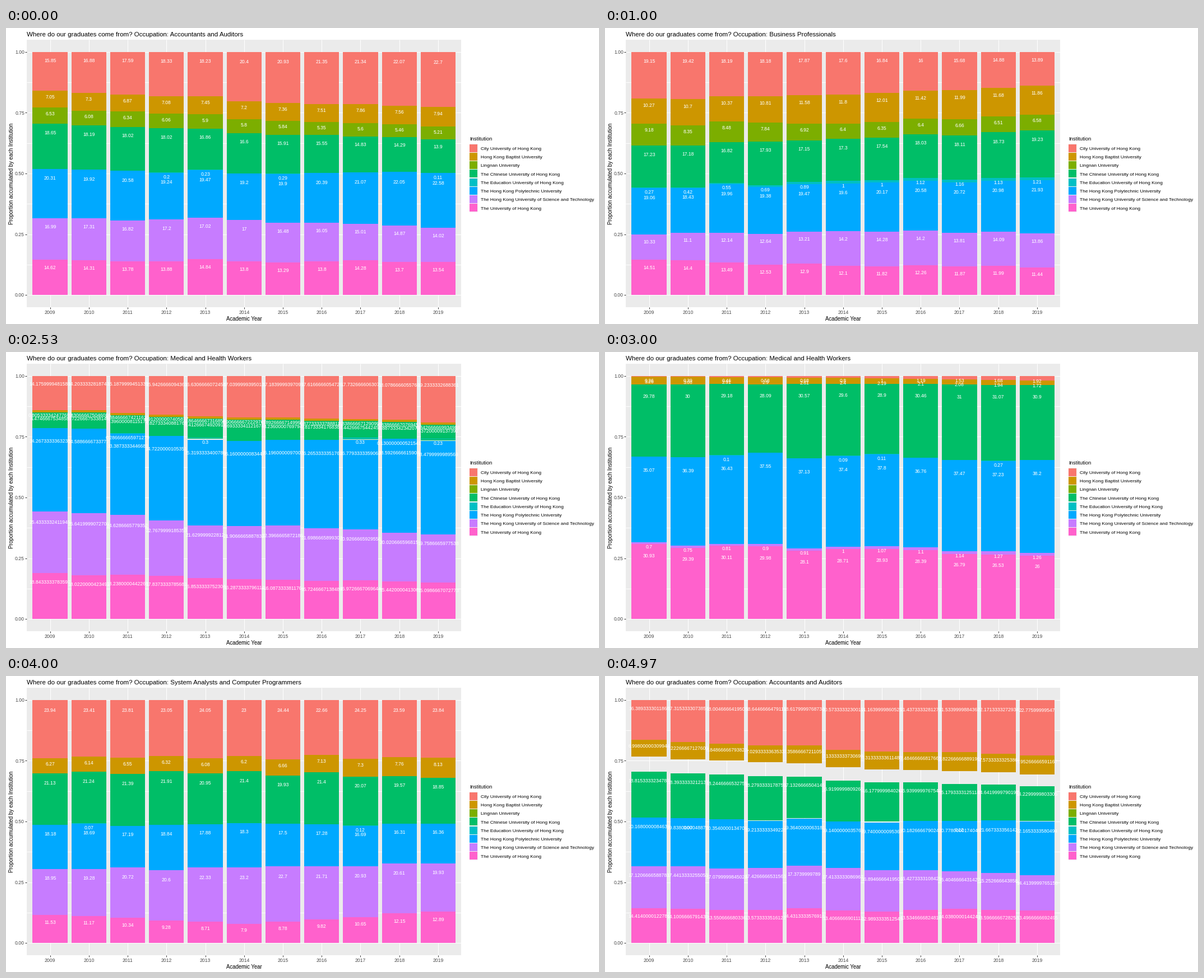
Write a matplotlib script that moves like this. It is 1058 px wide and 529 px high and loops after 5000 ms.

```python
import numpy as np
import matplotlib.pyplot as plt
from matplotlib.animation import FuncAnimation
from matplotlib.patches import Rectangle

W, H, DPI = 1058, 529, 100
YEARS = np.arange(2009, 2020)
SCHOOLS = {
    "City University of Hong Kong": "#F8766D",
    "Hong Kong Baptist University": "#CD9600",
    "Lingnan University": "#7CAE00",
    "The Chinese University of Hong Kong": "#00BE67",
    "The Education University of Hong Kong": "#00BFC4",
    "The Hong Kong Polytechnic University": "#00A9FF",
    "The Hong Kong University of Science and Technology": "#C77CFF",
    "The University of Hong Kong": "#FF61CC",
}
RARE = 4                      # the school that only shows up now and then

# Shares in the first, middle and last year; the last school takes the rest
KEY_YEARS = [2009, 2014, 2019]
TRENDS = {
    "Accountants and Auditors": (
        (15.85, 7.05, 6.53, 18.65, 0, 20.31, 16.99),
        (20.4, 7.2, 5.8, 16.6, 0, 19.2, 17),
        (22.7, 7.94, 5.21, 13.9, 0, 22.58, 14.02)),
    "Business Professionals": (
        (19.15, 10.27, 9.18, 17.23, 0.27, 19.06, 10.33),
        (17.6, 11.8, 6.4, 17.3, 1, 19.6, 14.2),
        (13.89, 11.86, 6.58, 19.23, 1.21, 21.93, 13.86)),
    "Engineers": (
        (15.17, 0.63, 0, 4.81, 0, 34.21, 27.2),
        (18.2, 0.8, 0, 7.2, 0, 35, 23.4),
        (20.47, 0.78, 0, 4.62, 0, 38.5, 21.08)),
    "Medical and Health Workers": (
        (0.26, 3.26, 0, 29.78, 0, 35.07, 0.7),
        (0.8, 2.4, 0, 29.6, 0, 37.4, 1),
        (1.92, 1.72, 0, 30.9, 0, 38.2, 1.26)),
    "System Analysts and Computer Programmers": (
        (23.94, 6.27, 0, 21.13, 0, 18.18, 18.95),
        (23, 6.2, 0, 21.4, 0, 18.3, 23.2),
        (23.84, 8.13, 0, 18.85, 0, 16.36, 19.93)),
}
NAMES = list(TRENDS)
STEPS, HOLD = 30, 15          # steps per state, last step of the rest
FRAMES, LOOP = 250, 5000

# Panel geometry in pixels
LEFT, RIGHT, TOP, BOTTOM = 37, 812, 21, 499
Y0, Y1 = 477.2, 42.8
PITCH = 69.23
BAR_W = 0.9 * PITCH
CENTRES = 78.65 + PITCH * np.arange(len(YEARS))

rng = np.random.default_rng(7)
plt.rcParams["font.family"] = "Liberation Sans"
fig = plt.figure(figsize=(W / DPI, H / DPI), dpi=DPI, facecolor="white")
ax = fig.add_axes([0, 0, 1, 1])
ax.set(xlim=(0, W), ylim=(H, 0))
ax.axis("off")


def to_y(p):
    return Y0 + (Y1 - Y0) * p


def box(x, y, w, h, color, z=1):
    return ax.add_patch(Rectangle((x, y), w, h, fc=color, lw=0, zorder=z))


def line(xs, ys, color, z):
    ax.plot(xs, ys, color=color, lw=72 / DPI, solid_capstyle="butt", zorder=z)


def text(x, y, s, px, color="black", **kw):
    kw = {"ha": "left", "va": "baseline", "zorder": 6, **kw}
    return ax.text(x, y, s, fontsize=px * 72 / DPI, color=color, **kw)


def shares(keys):
    """Yearly percentages along the trend, with a little scatter between."""
    v = np.array([np.interp(YEARS, KEY_YEARS, col) for col in zip(*keys)])
    if not v[RARE].any():
        seen = rng.random(len(YEARS)) < 0.4
        v[RARE] = seen * rng.uniform(0.06, 0.35, len(YEARS))
    v = np.vstack([v, 100 - v.sum(axis=0)])
    scatter = rng.normal(0, 0.03, v.shape) * ~np.isin(YEARS, KEY_YEARS)
    v *= 1 + scatter
    v = np.round(100 * v / v.sum(axis=0), 2)
    return np.where(v > 0, v, np.nan)


def layout(v):
    """Stack each year to 1; returns values, tops and bottoms."""
    share = np.nan_to_num(v) / np.nansum(v, axis=0)
    top = np.cumsum(share[::-1], axis=0)[::-1]
    return np.where(np.isnan(v), np.nan, np.stack([v, top, top - share]))


def draw_static():
    box(LEFT, TOP, RIGHT - LEFT, BOTTOM - TOP, "#EBEBEB")
    for i in range(1, 8, 2):
        line([LEFT, RIGHT], [to_y(i / 8)] * 2, "white", 2)
    for i in range(5):
        y = to_y(i / 4)
        line([LEFT, RIGHT], [y] * 2, "white", 2)
        line([LEFT - 3, LEFT], [y] * 2, "#333333", 3)
        text(33, y + 3.2, f"{i / 4:.2f}", 8.6, "#4D4D4D", ha="right")
    for x, year in zip(CENTRES, YEARS):
        line([x] * 2, [TOP, BOTTOM], "white", 2)
        line([x] * 2, [BOTTOM, BOTTOM + 3], "#333333", 3)
        text(x, 510.6, str(year), 8.6, "#4D4D4D", ha="center")
    text(424.5, 523.2, "Academic Year", 9.7, ha="center")
    text(13.2, 260, "Proportion accumulated by each Institution", 9.65,
         ha="center", rotation=90, rotation_mode="anchor")
    text(827, 201, "Institution", 9.4)
    for i, (name, color) in enumerate(SCHOOLS.items()):
        y = 214.7 + 15.25 * i
        box(827, y - 7.6, 15, 15.25, "#F2F2F2")
        box(827, y - 7, 14, 14, color, 2)
        text(847, y + 3.2, name, 8.43)


draw_static()
layouts = [layout(shares(keys)) for keys in TRENDS.values()]
title = text(37, 15, "", 11.5)
bars, labels = [], []
for color in SCHOOLS.values():
    for x in CENTRES:
        bars.append(box(x - BAR_W / 2, 0, BAR_W, 0, color, 4))
        labels.append(text(x, 0, "", 8.6, "white", ha="center"))


def update(i):
    # Steps start on whole hundredths of a second
    tick = 2 * i + 1
    state, local = divmod((3 * tick + 2) // 10, STEPS)
    k = max(0, local - HOLD)
    after = (state + 1) % len(NAMES)
    a, b = layouts[state], layouts[after]
    # Single-precision progress gives the long decimals their tails
    t = float(np.float32(k / (STEPS - HOLD)))
    # Leaving parts stay put; arriving parts wait for the next rest
    now = np.where(np.isnan(b), a, a + (b - a) * t)
    name = NAMES[after if k else state]
    title.set_text(f"Where do our graduates come from? Occupation: {name}")
    for bar, label, (v, top, bottom) in zip(bars, labels, now.reshape(3, -1).T):
        shown = not np.isnan(v)
        bar.set_visible(shown)
        label.set_visible(shown)
        if shown:
            y, low = to_y(top), to_y(bottom)
            bar.set_y(y)
            bar.set_height(low - y)
            label.set_text(f"{v:.15g}")
            label.set_y(y + 0.1 * (low - y) + 10.9)
    return [title, *bars, *labels]


anim = FuncAnimation(fig, update, frames=FRAMES, interval=LOOP / FRAMES,
                     init_func=lambda: update(0), repeat=True, repeat_delay=0,
                     blit=False)
plt.show()
```
